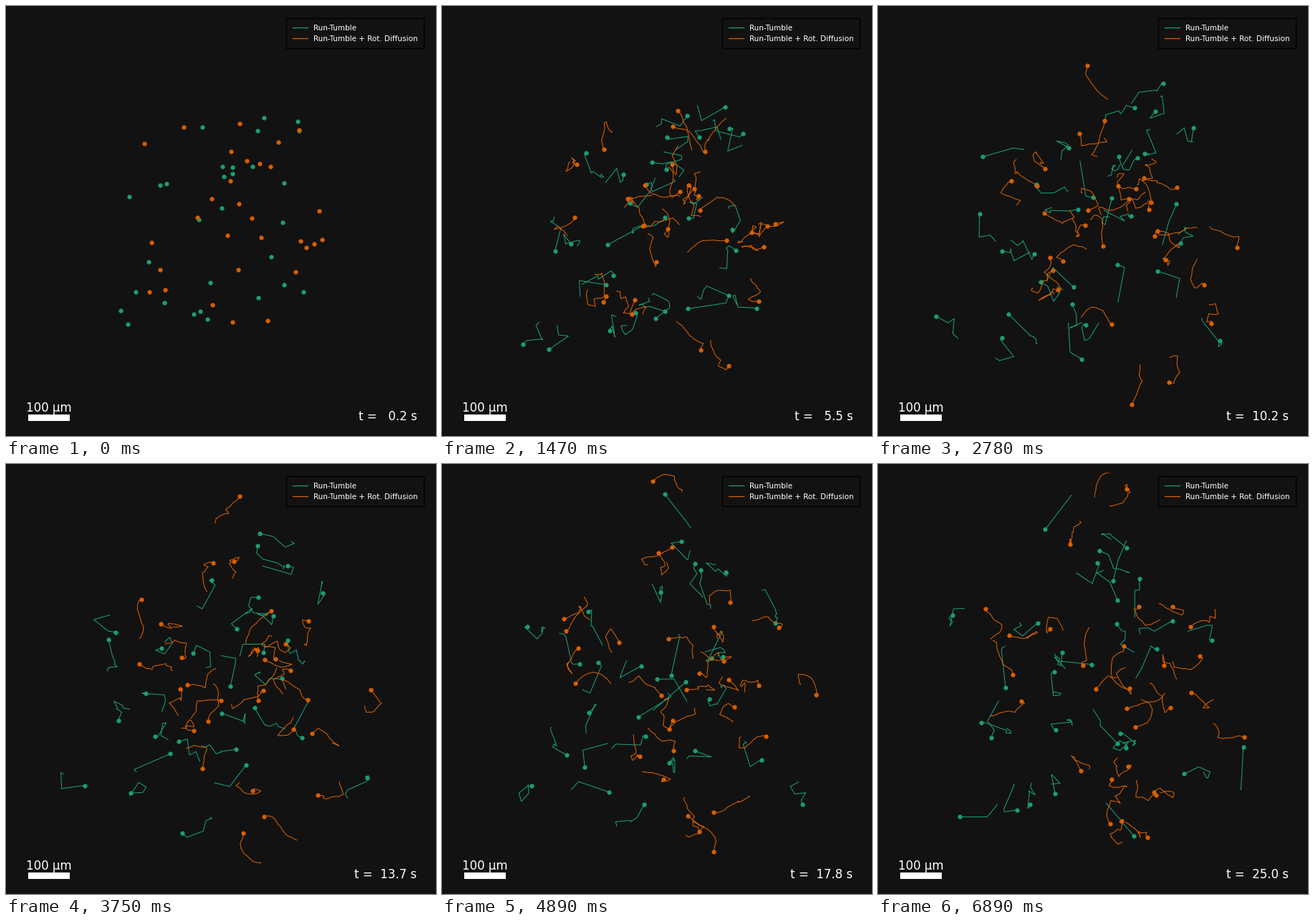
A matplotlib script that plays this animation: 600x600 px, repeating every 6920 ms.

```python
import numpy as np
import matplotlib.pyplot as plt
from matplotlib.animation import FuncAnimation
from matplotlib.collections import LineCollection
from matplotlib.lines import Line2D
from matplotlib.patches import Rectangle

STEPS, LOOP_MS = 249, 6920
FRAMES = STEPS + 1     # the last step is held for one more frame
DT, T0 = 0.1, 0.2      # seconds per step, time of the first step
PX = 0.576             # pixels per micrometre
SPEED = 30 * PX        # pixels per second
HALF = 250 * PX        # half width of the starting square
WALKERS = 30           # per group
TRAIL = 35             # steps kept in a trail
RUN_TIME = 1.0         # mean run length in seconds
BG, TEAL, ORANGE = "#121212", "#1b9e77", "#d95f02"


def walk(rot_diff, rng):
    """Paths of run-and-tumble walkers, shape (steps, walkers, 2)."""
    shape = (STEPS - 1, WALKERS)
    start = 300 + rng.uniform(-HALF, HALF, (1, WALKERS, 2))
    tumble = rng.random(shape) < DT / RUN_TIME
    angle = np.radians(rng.normal(80, 42, shape)) * rng.choice([-1, 1], shape)
    turn = np.where(tumble, angle, 0)
    turn += rng.normal(0, 1, shape) * np.sqrt(2 * rot_diff * DT)
    heading = rng.uniform(0, 2 * np.pi, WALKERS) + np.cumsum(turn, axis=0)
    moves = SPEED * DT * np.stack([np.cos(heading), np.sin(heading)], axis=-1)
    return np.concatenate([start, start + np.cumsum(moves, axis=0)])


fig = plt.figure(figsize=(6, 6), dpi=100, facecolor=BG)
ax = fig.add_axes([0.02, 0.02, 0.96, 0.96])
ax.set(xlim=(12, 588), ylim=(588, 12))
ax.axis("off")

rng = np.random.default_rng(5)
swarms = []
for color, rot_diff, z in ((TEAL, 0, 2), (ORANGE, 0.12, 3)):
    trails = LineCollection([], colors=color, linewidths=0.75, zorder=z)
    ax.add_collection(trails, autolim=False)
    heads, = ax.plot([], [], "o", color=color, ms=4.5, mew=0, zorder=z)
    swarms.append((walk(rot_diff, rng), trails, heads))

ax.legend(
    [Line2D([], [], color=c, lw=0.9) for c in (TEAL, ORANGE)],
    ["Run-Tumble", "Run-Tumble + Rot. Diffusion"],
    loc="upper right", prop={"family": "DejaVu Sans", "size": 7.5},
    labelcolor="white", facecolor=BG, edgecolor="black", framealpha=1,
    fancybox=False, borderpad=0.8).set_zorder(5)

label = dict(color="white", family="DejaVu Sans", size=12, va="baseline", zorder=6)
ax.add_patch(Rectangle((31, 570), 58, 9, color="white", lw=0, zorder=6))
ax.text(59.5, 566, "100 µm", ha="center", **label)
clock = ax.text(573.5, 578, "", ha="right", **label)


def update(frame):
    i = min(frame, STEPS - 1)
    for path, trails, heads in swarms:
        trails.set_segments(list(path[max(0, i - TRAIL):i + 1].swapaxes(0, 1)))
        heads.set_data(path[i, :, 0], path[i, :, 1])
    clock.set_text(f"t = {T0 + i * DT:5.1f} s")
    return [a for s in swarms for a in s[1:]] + [clock]


anim = FuncAnimation(fig, update, frames=FRAMES, interval=LOOP_MS / FRAMES,
                     repeat=True, repeat_delay=0, blit=False)
plt.show()
```
